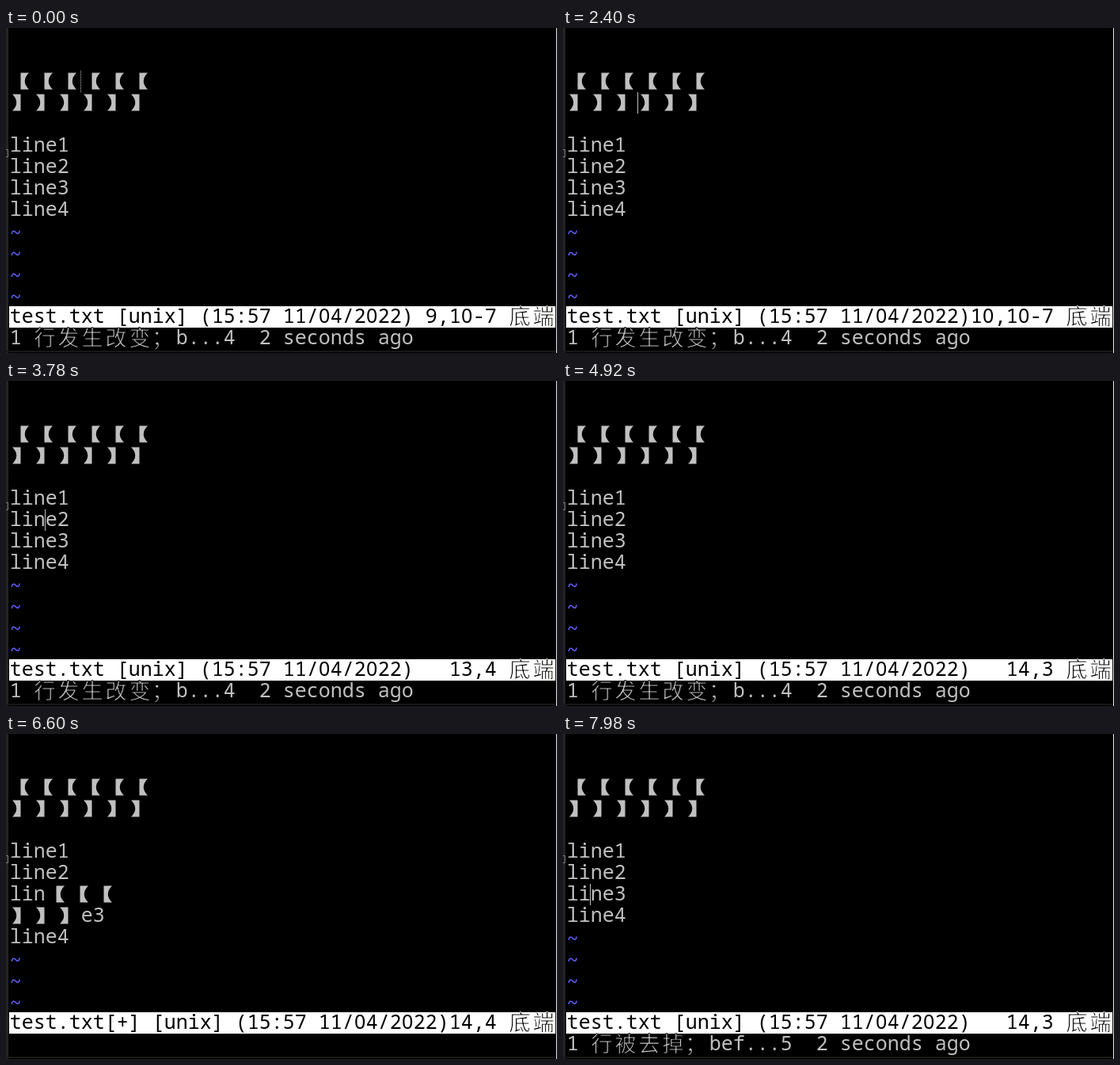
Write an HTML page with a canvas that moves like this. It is 696 px wide and 410 px high and loops after 8000 ms.

```html
<!DOCTYPE html>
<html lang="zh">
<head>
<meta charset="utf-8">
<title>Editor session</title>
<style>
html, body { margin: 0; width: 100%; height: 100%; overflow: hidden; background: #000; }
canvas { display: block; }
</style>
</head>
<body>
<canvas id="stage" width="696" height="410"></canvas>
<script>
const ctx = document.getElementById('stage').getContext('2d');
const LOOP = 8000, LEFT = 4, CELL = 15, ROW = 27, BASE = 21;
const GREY = '#c0c0c0', BLUE = '#6060ff', BLACK = '#000', WHITE = '#fff';
const MONO = '500 25px "Noto Sans Mono", monospace';
const PLAIN = '500 25px "Noto Sans", sans-serif';
const WIDE = '300 27px "Noto Sans CJK SC", "Noto Sans CJK", sans-serif';

const HEAD = ['', '', '【【【【【【', '】】】】】】', '', 'line1', 'line2'];
const BEFORE = [...HEAD, 'line3', 'line4'];
const PASTED = [...HEAD, 'lin【【【', '】】】e3', 'line4'];
const CHANGED = '1 行发生改变；b...4  2 seconds ago';
const REMOVED = '1 行被去掉；bef...5  2 seconds ago';

// Each table starts with the time from which its value holds.
const cursors = [ // time, row, column
  [0, 2, 6], [2340, 3, 6], [2700, 4, 0], [3060, 5, 4], [3240, 6, 4],
  [3780, 6, 3], [4020, 7, 3], [4380, 7, 2], [5100, 7, 3], [6960, 7, 2]
];
const rulers = [
  [0, '9,10-7'], [2400, '10,10-7'], [2700, '11,0-1'], [3060, '12,5'],
  [3240, '13,5'], [3780, '13,4'], [4020, '14,4'], [4380, '14,3'],
  [5100, '14,4'], [6960, '14,3']
];
const messages = [
  [0, CHANGED], [900, CHANGED + ' y'], [1200, CHANGED + ' yg'],
  [1440, CHANGED], [5100, ''], [6960, REMOVED]
];
const hidden = [[720, 900], [1920, 2340], [4920, 5100], [5640, 6120], [6600, 6960], [7440, 7980]];

const at = (table, t) => table.filter(e => e[0] <= t).pop();
const isWide = ch => ch > '\u2e80';

function bracket(x, y, flip) {
  ctx.save();
  ctx.translate(x + 14.5, y);
  if (flip) ctx.scale(-1, 1);
  ctx.beginPath();
  ctx.moveTo(0, 2.5);
  ctx.lineTo(10.5, 2.5);
  ctx.quadraticCurveTo(0, 13, 10.5, 23.5);
  ctx.lineTo(0, 23.5);
  ctx.fill();
  ctx.restore();
}

// Wide characters are trimmed with the background colour to get thin strokes.
function wideGlyph(ch, x, y, back) {
  ctx.font = WIDE;
  const left = ch === '；';
  ctx.textAlign = left ? 'left' : 'center';
  if (!left) x += CELL;
  ctx.fillText(ch, x, y);
  ctx.strokeStyle = back;
  ctx.lineWidth = 0.8;
  ctx.lineJoin = 'round';
  ctx.strokeText(ch, x, y);
}

function glyph(ch, x, y, back) {
  if (ch === '【' || ch === '】') return bracket(x, y, ch === '】');
  if (isWide(ch)) return wideGlyph(ch, x, y + BASE + 2, back);
  ctx.font = ch === '0' ? PLAIN : MONO;
  ctx.textAlign = 'center';
  const drop = ch === '~' ? 3 : 0;
  ctx.fillText(ch, x + CELL / 2 + 0.7, y + BASE + drop);
}

function print(text, row, color, col = 0, back = BLACK) {
  ctx.fillStyle = color;
  for (const ch of text) {
    if (ch !== ' ') glyph(ch, LEFT + col * CELL, row * ROW, back);
    col += isWide(ch) ? 2 : 1;
  }
}

function frame() {
  ctx.fillStyle = BLACK;
  ctx.fillRect(0, 0, 696, 410);
  ctx.fillStyle = '#242424';
  ctx.fillRect(0, 0, 3, 410);
  ctx.fillStyle = '#181818';
  ctx.fillRect(0, 407, 696, 2);
  ctx.fillStyle = '#e8e8e8';
  ctx.fillRect(695, 0, 1, 410);
  ctx.strokeStyle = '#808080';
  ctx.lineWidth = 1;
  ctx.strokeRect(-2.5, 153.5, 5, 9);
}

function cursor(t) {
  if (hidden.some(([a, b]) => t >= a && t < b)) return;
  const [, row, col] = at(cursors, t);
  const x = LEFT + col * CELL, y = row * ROW;
  ctx.fillStyle = GREY;
  if (t >= 180) ctx.fillRect(x, y, 1, ROW);
  else for (let i = 0; i < ROW; i += 2) ctx.fillRect(x, y + i, 1, 1);
}

function draw(t) {
  const edited = t >= 5100 && t < 6960;
  const lines = edited ? PASTED : BEFORE;
  frame();
  for (let row = 0; row < 13; row++) {
    if (row < lines.length) print(lines[row], row, GREY);
    else print('~', row, BLUE);
  }
  ctx.fillStyle = WHITE;
  ctx.fillRect(LEFT, 13 * ROW, 46 * CELL, ROW);
  print(`test.txt${edited ? '[+]' : ''} [unix] (15:57 11/04/2022)`, 13, BLACK);
  const ruler = at(rulers, t)[1];
  print(ruler + ' 底端', 13, BLACK, 41 - ruler.length, WHITE);
  print(at(messages, t)[1], 14, GREY);
  cursor(t);
}

const start = performance.now();
function tick() {
  draw((performance.now() - start) % LOOP);
  requestAnimationFrame(tick);
}
tick();
</script>
</body>
</html>
```
